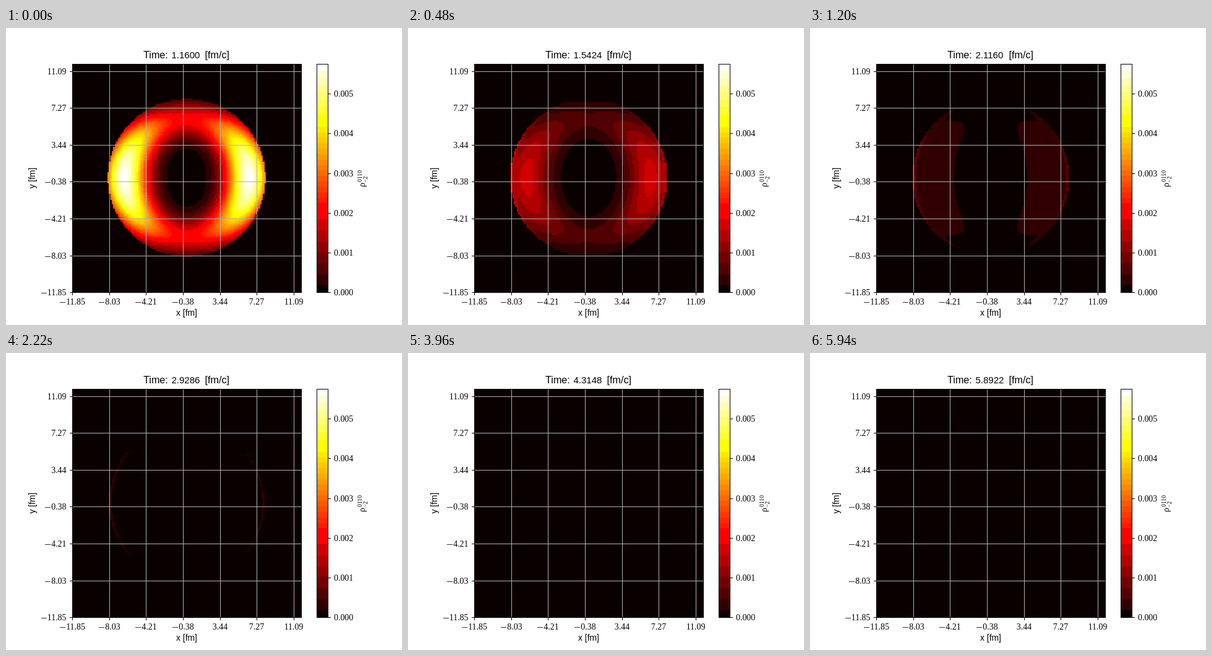
Write an HTML page with a canvas that moves like this. It is 640 by 480 pixels and loops after 6 s.

```html
<!DOCTYPE html>
<html>
<head>
<meta charset="utf-8">
<style>
  html, body { margin: 0; width: 100%; height: 100%; overflow: hidden; background: #fff; }
  canvas { display: block; }
</style>
</head>
<body>
<canvas id="stage" width="640" height="480"></canvas>
<script>
const ctx = document.getElementById('stage').getContext('2d');
const SERIF = '"Liberation Serif", serif', SANS = '"Liberation Sans", sans-serif';
const LEFT = 107, TOP = 58, RIGHT = 477, BOTTOM = 427;
const CELLS = 156, HALF = 11.85, STEP = 2 * HALF / (CELLS - 1), CELL = 370 / CELLS;
const VMAX = 5.755, TICK = 59.61;
const TICK_LABELS = ['-11.85', '-8.03', '-4.21', '-0.38', '3.44', '7.27', '11.09'];

const clamp = (v, lo, hi) => Math.min(hi, Math.max(lo, v));

// Black-red-yellow-white ramp in coarse colour steps
function band(v, size, low) {
  const k = Math.floor(clamp(v, 0, 255) / size);
  return k === 0 ? low : (k + 1) * size > 255 ? 255 : (k + 0.5) * size;
}
function heat(value) {
  const u = value / VMAX;
  const r = band(10.6 + u / 0.365 * 244.4, 32, 11);
  const g = band((u - 0.365) / 0.381 * 255, 16, 0);
  const b = band((u - 0.746) / 0.254 * 255, 32, 0);
  return `rgb(${r},${g},${b})`;
}

// Ring-shaped density (in units of 0.001) with a slowly fading rim
function makeField(t) {
  const radius = 8.2 - 0.06 * (t - 1.16);
  const peakX = 5.7 * (1.16 / t) ** 4.3;
  const peakY = 2 * (1.16 / t) ** 4.7;
  const power = 3.8 - 3 * clamp(t - 1.5, 0, 0.7) ** 2;
  const rim = 0.34 * (2.93 / t) ** 2.36 * (1 - Math.exp((1.16 - t) / 0.4));
  return (x, y) => {
    const r = Math.hypot(x, y);
    if (r > radius) return 0;
    const c2 = (x / r) ** 2;
    const s = r / (6.1 + 0.4 * c2);
    const p = power + 1.3 * (1 - c2);
    const body = (peakY + (peakX - peakY) * c2) * s ** p * Math.exp(p / 4 * (1 - s ** 4));
    return body + rim * c2 * (1 - 0.02 * x) * Math.exp((r - radius) / 0.2);
  };
}

function rect(color, x, y, w, h) {
  ctx.fillStyle = color;
  ctx.fillRect(x, y, w, h);
}
function text(str, x, y, size, family, align = 'left') {
  ctx.fillStyle = '#000';
  ctx.font = `${size}px ${family}`;
  ctx.textAlign = align;
  ctx.fillText(str, x, y);
}
// Signed number with a wide minus, placed by its right end or its centre
function number(str, x, y, centred) {
  const digits = str.replace('-', ''), negative = digits !== str;
  ctx.font = `13.9px ${SERIF}`;
  const width = ctx.measureText(digits).width;
  const end = centred ? x + (width + (negative ? 11 : 0)) / 2 : x;
  text(digits, end, y, 13.9, SERIF, 'right');
  if (negative) rect('#333', Math.round(end - width - 10), Math.round(y) - 4, 9, 1);
}
function turned(x, y, paint) {
  ctx.save();
  ctx.translate(x, y);
  ctx.rotate(-Math.PI / 2);
  paint();
  ctx.restore();
}
function frame(x, y, right, bottom) {
  ctx.strokeStyle = '#000';
  ctx.lineWidth = 1;
  ctx.strokeRect(x + 0.5, y + 0.5, right - x, bottom - y);
}

function drawField(t) {
  const field = makeField(t);
  const edge = i => Math.round(i * CELL);
  rect(heat(0), LEFT, TOP, RIGHT - LEFT, BOTTOM - TOP);
  for (let j = 0; j < CELLS; j++) {
    for (let i = 0; i < CELLS; i++) {
      const v = field(i * STEP - HALF, HALF - j * STEP);
      if (v > 0.18) {
        rect(heat(v), LEFT + edge(i), 57 + edge(j), edge(i + 1) - edge(i), edge(j + 1) - edge(j));
      }
    }
  }
}

function drawAxes() {
  TICK_LABELS.forEach((label, k) => {
    const x = Math.round(107.2 + k * TICK), y = Math.round(427.2 - k * TICK);
    rect('#b0b0b0', x, TOP, 1, BOTTOM - TOP);
    rect('#b0b0b0', LEFT, y, RIGHT - LEFT, 1);
    rect('#000', x, BOTTOM, 1, 5);
    rect('#000', LEFT - 4, y, 4, 1);
    number(label, x, 447, true);
    number(label, 97.5, y + 5, false);
  });
  frame(LEFT, TOP, RIGHT, BOTTOM);
  text('x [fm]', 292, 465, 13.9, SANS, 'center');
  turned(47, 242.5, () => text('y [fm]', 0, 0, 13.9, SANS, 'center'));
}

function drawColorbar() {
  for (let y = TOP; y < BOTTOM; y++) {
    rect(heat((427.2 - y - 0.5) / 369.6 * VMAX), 502, y, 18, 1);
  }
  frame(502, TOP, 520, BOTTOM);
  for (let k = 0; k < 6; k++) {
    const y = Math.round(427.2 - k * 64.22);
    rect('#000', 521, y, 4, 1);
    text('0.00' + k, 530, y + 5, 13.9, SERIF);
  }
  turned(580, 257, () => {
    text('ρ', 0, 0, 13.9, 'italic'.length ? SERIF : SERIF);
    text('0110', 8, -5, 9.7, SERIF);
    text('−2', 7, 4, 9.7, SERIF);
  });
}

function draw(step) {
  const t = 1.16 + 0.0478 * step;
  rect('#fff', 0, 0, 640, 480);
  drawField(t);
  drawAxes();
  drawColorbar();
  text('Time:', 222, 49, 16.2, SANS);
  text(t.toFixed(4), 267.5, 49, 15, SANS);
  text('[fm/c]', 361, 49, 16.2, SANS, 'right');
}

let shown = -1;
function tick() {
  const step = Math.floor(performance.now() % 6000 / 60);
  if (step !== shown) draw(shown = step);
  requestAnimationFrame(tick);
}
tick();
</script>
</body>
</html>
```
